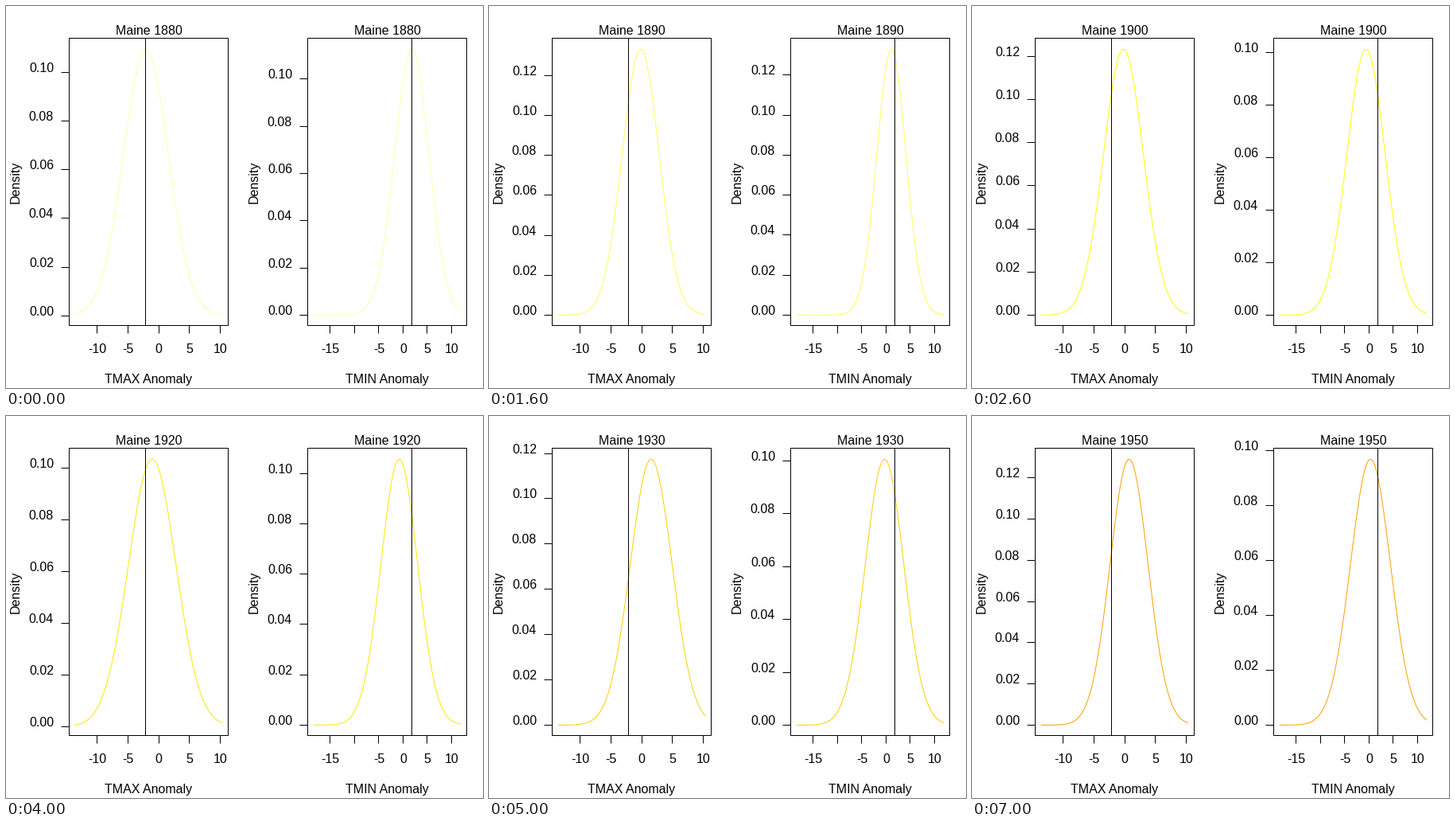
These frames come from a looping animation (600 by 480 pixels, 8000 ms). A matplotlib script:

```python
import numpy as np
import matplotlib.pyplot as plt
from matplotlib.animation import FuncAnimation
from matplotlib.patches import Rectangle

W, H, DPI = 600, 480, 100
PX = 72 / DPI
TOP, BOTTOM = 40.5, 401.5        # plot box
PEAK_Y, BASE_Y = 54.3, 388.4     # highest and lowest point of each curve

plt.rcParams["font.family"] = "Liberation Sans"
plt.rcParams["font.size"] = 16 * PX

fig = plt.figure(figsize=(W / DPI, H / DPI), dpi=DPI, facecolor="white")
ax = fig.add_axes([0, 0, 1, 1])
ax.set_xlim(0, W)
ax.set_ylim(H, 0)
ax.axis("off")


def crisp(v):
    return np.floor(v) + 0.5


def line(x, y, color="black", z=2):
    return ax.plot(x, y, color=color, lw=PX, snap=False, zorder=z,
                   solid_capstyle="butt")[0]


def label(x, y, s, ha="center", **kw):
    return ax.text(x, y, s, ha=ha, va="baseline", **kw)


class Panel:
    def __init__(self, left, name, zero, unit, ticks, skip, mark, params):
        self.left, self.zero, self.unit, self.params = left, zero, unit, params
        mid = left + 100
        ax.add_patch(Rectangle((left, TOP), 200, BOTTOM - TOP, fill=False,
                               lw=PX, snap=False, zorder=3))
        for t in ticks:
            x = zero + t * unit
            line([crisp(x)] * 2, [BOTTOM, BOTTOM + 10])
            if t not in skip:
                label(x, 436, str(t))
        label(mid, 474, name + " Anomaly")
        ax.text(left - 62.5, 221, "Density", rotation=90, ha="right",
                va="center", rotation_mode="default").set_visible(False)
        ax.text(left - 62.5, 221, "Density", rotation=90, ha="center",
                va="baseline", rotation_mode="anchor")
        line([crisp(mark)] * 2, [TOP, BOTTOM], z=4)

        self.title = label(mid, 36, "")
        self.curve = line([], [], z=2.5)
        self.ticks = [(line([], []), label(left - 19.5, 0, f"{k * 0.02:.2f}", "right"))
                      for k in range(8)]
        self.px = np.linspace(left + 7.2, left + 192.5, 200)

    def draw(self, i, title, color):
        mean, sd = self.params[i]
        x = (self.px - self.zero) / self.unit
        d = np.exp(-((x - mean) / sd) ** 2 / 2) / (sd * np.sqrt(2 * np.pi))
        scale = (BASE_Y - PEAK_Y) / (d.max() - d.min())
        zero_y = BASE_Y + d.min() * scale

        self.title.set_text(title)
        self.curve.set_data(self.px, zero_y - d * scale)
        self.curve.set_color(color)
        for k, (tick, text) in enumerate(self.ticks):
            y = crisp(zero_y - k * 0.02 * scale)
            shown = y > TOP
            tick.set_data([self.left - 10, self.left], [y, y])
            text.set_y(y - 0.5)
            tick.set_visible(shown)
            text.set_visible(shown)


panels = [
    Panel(79.5, "TMAX", 192, 7.73, range(-10, 11, 5), (), 175.9,
          [(-2.07, 3.645), (-0.15, 2.996), (-0.2, 3.234), (-0.3, 3.833),
           (-1.05, 3.862), (1.55, 3.397), (1.1, 3.25), (0.72, 3.089)]),
    Panel(379.5, "TMIN", 499.4, 6.1, range(-15, 11, 5), (-10,), 510.4,
          [(1.8, 3.54), (1.1, 3.0), (-0.62, 3.94), (-0.67, 3.907),
           (-0.78, 3.776), (-0.3, 3.964), (0.0, 4.04), (0.3, 4.118)]),
]


def update(i):
    green = 255 - 24 * max(0, i - 3)
    blue = max(0, 170 - 85 * i)
    for p in panels:
        p.draw(i, f"Maine {1880 + 10 * i}", (1, green / 255, blue / 255))


anim = FuncAnimation(fig, update, frames=8, init_func=lambda: update(0),
                     interval=1000, repeat=True, repeat_delay=0, blit=False)
plt.show()
```
